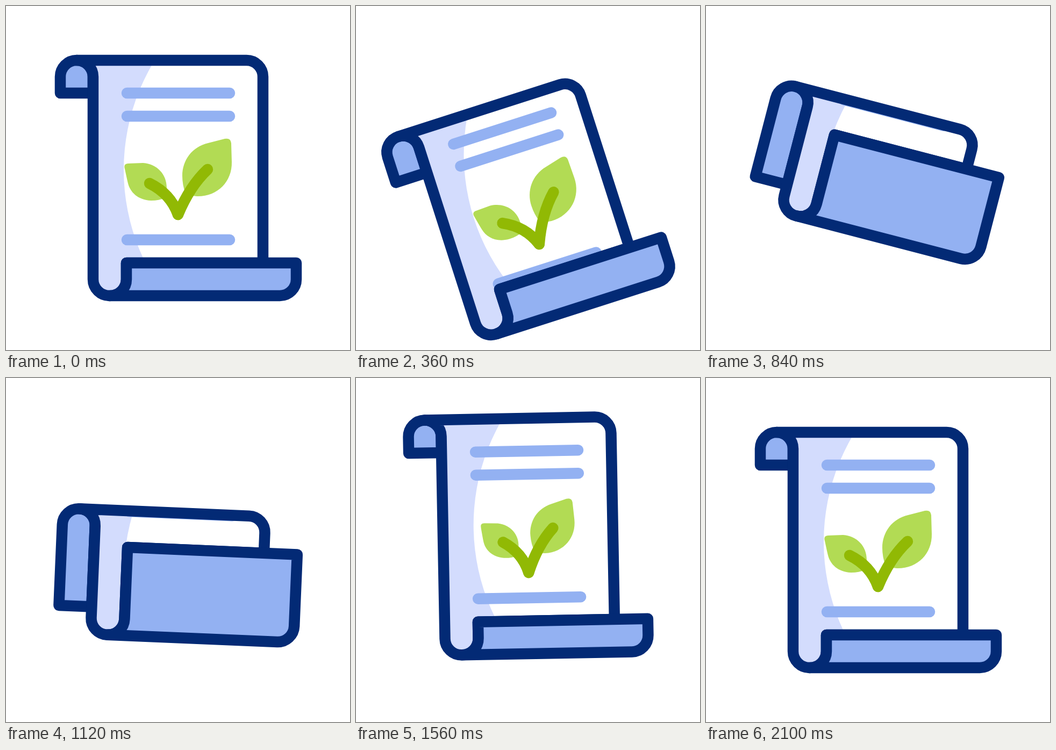
An HTML page with a canvas for the animation above (2.4 s loop, 640 px wide and 640 px high).

```html
<!DOCTYPE html>
<html lang="en">
<head>
<meta charset="utf-8">
<title>Scroll with sprout</title>
<style>
html, body { margin: 0; width: 100%; height: 100%; overflow: hidden; background: #fff; }
canvas { display: block; width: 640px; height: 640px; }
</style>
</head>
<body>
<canvas id="stage" width="640" height="640"></canvas>
<script>
const ctx = document.getElementById('stage').getContext('2d');
const LOOP = 2400, RAD = Math.PI / 180, R = 30.5;
const NAVY = '#032a75', BLUE = '#93b1f2', SHADE = '#d3dcfd',
      LEAF = '#b2db54', STEM = '#91b904', TEAL = '#68ccd1';

// Keys are [ms, value] pairs, joined by an ease in and out.
const TILT = [[0, 0], [385, -18], [850, 14.6], [1340, -6.4], [1760, 3.5], [2100, 0]];
const DROP = [[0, 0], [385, 59], [670, -34], [1150, 48], [1480, -38], [1745, 15.5], [2100, 0]];
const ROLL = [[0, 0], [220, 4], [860, 103], [1240, 103], [1520, 0]];
const FOLD = [[385, 0], [850, 1.37], [1240, 1.37], [1700, 0]];

const ease = u => {
  u = Math.min(1, Math.max(0, u));
  return u * u * (3 - 2 * u);
};

function at(keys, t) {
  let [t0, v] = keys[0];
  for (const [t1, v1] of keys.slice(1)) {
    if (t <= t1) return v + (v1 - v) * ease((t - t0) / (t1 - t0));
    [t0, v] = [t1, v1];
  }
  return v;
}

function fill(path, color) {
  ctx.fillStyle = color;
  ctx.fill(path);
}

function stroke(path, color) {
  ctx.strokeStyle = color;
  ctx.stroke(path);
}

const line = (x0, y0, x1, y1) => new Path2D(`M${x0} ${y0}L${x1} ${y1}`);

const branches = [
  {
    turn: 11, end: [-53, -58],
    stem: new Path2D('M-53 -58Q-14 -39 0 0'),
    leaf: new Path2D('M-99 -85Q-102 -95 -92 -95L-65 -96C-39 -94 -21 -75 -21 -50' +
      'Q-21 -38 -24 -31Q-35 -26 -50 -26C-75 -27 -89 -42 -93 -58Q-95 -66 -99 -85Z')
  },
  {
    turn: -12, end: [55, -84],
    stem: new Path2D('M55 -84Q22 -53 0 0'),
    leaf: new Path2D('M87 -141Q98 -143 99 -133L100 -98C101 -61 73 -33 35 -34' +
      'Q22 -35 14 -39Q8 -55 8 -72C8 -101 26 -126 56 -133Z')
  }
];

function drawSprout(q) {
  const parts = branches.map(b => {
    const m = new DOMMatrix().translate(320, 388).rotate(b.turn * q).scale(1 - 0.2 * q);
    const [x, y] = b.end;
    const leafM = m.translate(x, y).scale((1 - 0.29 * q) / (1 - 0.2 * q)).translate(-x, -y);
    const leaf = new Path2D(), stem = new Path2D();
    leaf.addPath(b.leaf, leafM);
    stem.addPath(b.stem, m);
    return { leaf, stem };
  });
  parts.forEach(p => fill(p.leaf, LEAF));
  parts.forEach(p => stroke(p.stem, STEM));
}

function drawScroll(d, q) {
  const top = 101 + d, bottom = 539 - d;
  const curlY = top + R, footY = bottom - R;
  const flapEnd = 162 + 2.167 * d, flapTop = 478 - 2 * d;
  const arc = (x, y, sweep = 1) => `A${R} ${R} 0 0 ${sweep} ${x} ${y}`;

  const curl = new Path2D(`M162 ${flapEnd}H101V${curlY}${arc(131.5, top)}${arc(162, curlY)}Z`);
  const sheet = new Path2D(`M131.5 ${top}H447.5${arc(478, curlY)}V${flapTop}H224V${footY}` +
    `${arc(193, bottom)}${arc(162, footY)}V${curlY}${arc(131.5, top, 0)}Z`);
  const flap = new Path2D(`M224 ${flapTop}H540V${footY}${arc(509.5, bottom)}H193${arc(224, footY, 0)}Z`);

  fill(curl, BLUE);
  stroke(curl, NAVY);

  ctx.save();
  ctx.clip(sheet);
  ctx.fillStyle = SHADE;
  ctx.fillRect(100, 60, 400, 520);
  const light = new Path2D();
  light.arc(609, 305, 390, 0, 7);
  fill(light, '#fff');
  for (const y of [162, 205, 435]) stroke(line(225, y, 416, y), BLUE);
  drawSprout(q);
  ctx.restore();

  stroke(sheet, NAVY);
  fill(flap, BLUE);
  stroke(flap, NAVY);
}

// Each ray is its inner point and its direction.
const RAYS = [[470, 63, 0, -1], [514.5, 78, 0.68, -0.74], [528.5, 120, 1, 0]];

function drawRays(t) {
  const head = 28 * ease((t - 1640) / 130), tail = 28 * ease((t - 1700) / 180);
  if (head - tail < 0.1) return;
  for (const [x, y, dx, dy] of RAYS)
    stroke(line(x + dx * tail, y + dy * tail, x + dx * head, y + dy * head), TEAL);
}

function draw(now) {
  const t = now % LOOP;
  ctx.clearRect(0, 0, 640, 640);
  ctx.lineWidth = 20.5;
  ctx.lineCap = ctx.lineJoin = 'round';
  ctx.save();
  ctx.translate(320, 320 + at(DROP, t));
  ctx.rotate(at(TILT, t) * RAD);
  ctx.translate(-320, -320);
  drawScroll(at(ROLL, t), at(FOLD, t));
  ctx.restore();
  drawRays(t);
}

const start = performance.now();
function tick() {
  draw(performance.now() - start);
  requestAnimationFrame(tick);
}
tick();
</script>
</body>
</html>
```
